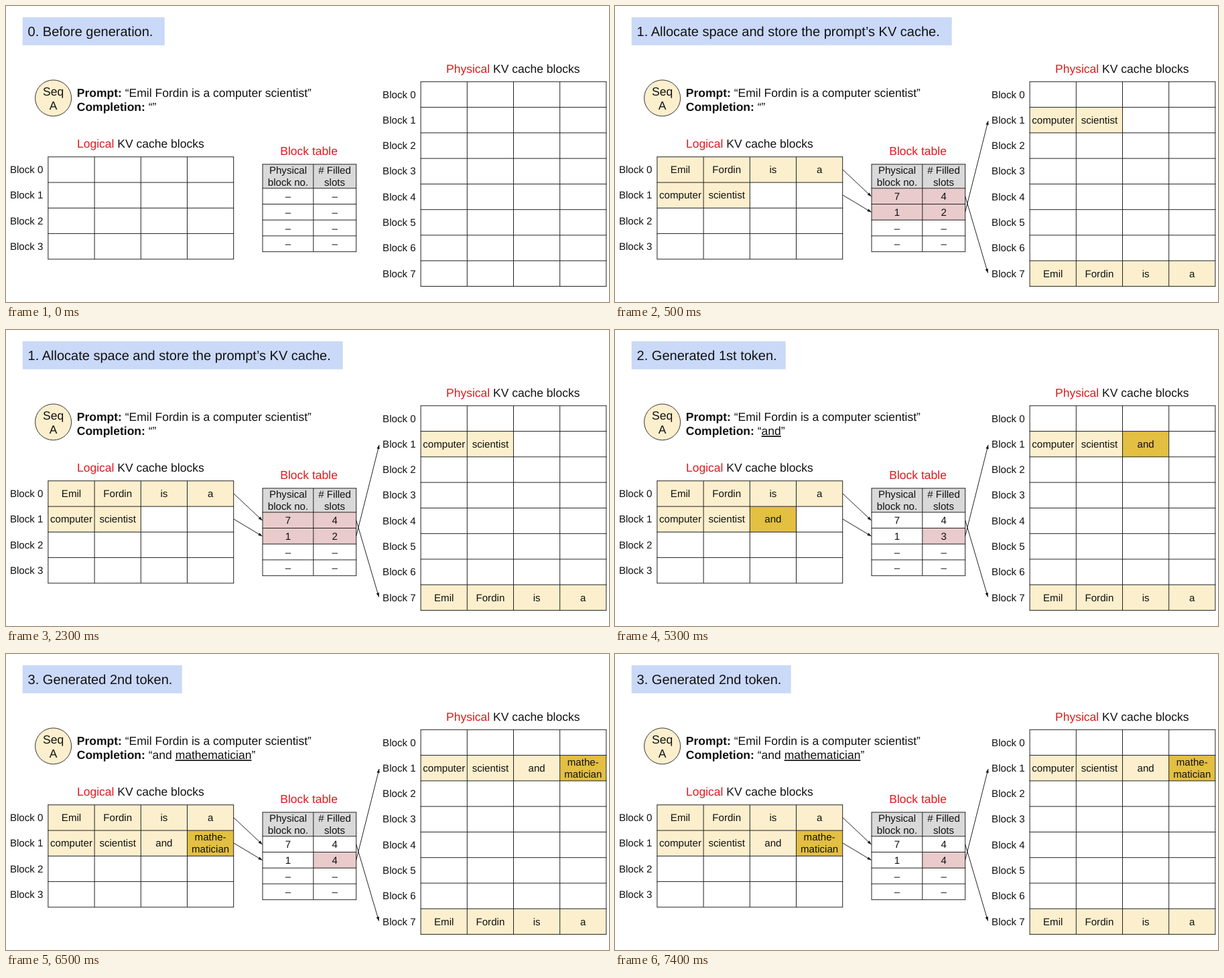
An HTML page for the animation above (8 s loop, 900 by 443 pixels).

```html
<!DOCTYPE html>
<html lang="en">
<head>
<meta charset="utf-8">
<title>KV cache blocks</title>
<style>
  html, body { margin: 0; width: 100%; height: 100%; overflow: hidden; background: #fff; }
  svg { display: block; width: 100%; height: 100%; }
  text {
    font-family: "Liberation Sans", Arial, sans-serif;
    fill: #111;
    text-rendering: geometricPrecision;
    white-space: pre;
  }
  .small { font-size: 15.1px; }
  .mid { font-size: 17.5px; }
  .title { font-size: 20px; }
  .center { text-anchor: middle; }
  .red { fill: #df1a1f; }
  .bold { font-weight: bold; }
  .under { text-decoration: underline; }
  .line { fill: none; stroke: #222; stroke-width: 1; }
</style>
</head>
<body>
<svg id="stage" viewBox="0 0 900 443"></svg>
<script>
const LOOP = 8000;
const CREAM = '#fcefcd', GOLD = '#e3bf42', PINK = '#e9cbcb', GREY = '#d9d9d9', BLUE = '#cad9f7';

const LOGICAL = { x: 62.9, y: 225.8, w: 69.2, h: 38.28, rows: 4 };
const PHYSICAL = { x: 619.1, y: 113.3, w: 69.2, h: 38.28, rows: 8 };
const TABLE = { cols: [383, 458.8, 522.7], top: 236.9, y: 272.8, h: 23.73, rows: 4 };

const FIRST = ['Emil', 'Fordin', 'is', 'a'];
const SECOND = ['computer', 'scientist', 'and', 'mathe-|matician'];

// used: tokens in the second block; hot: freshly written table cells, row then column
const STEPS = [
  { at: 0, title: '0. Before generation.', width: 212, used: 0, done: '', fresh: '', hot: [] },
  { at: 500, title: '1. Allocate space and store the prompt’s KV cache.', width: 478, used: 2,
    done: '', fresh: '', hot: ['00', '01', '10', '11'] },
  { at: 3500, title: '2. Generated 1st token.', width: 230, used: 3, done: '', fresh: 'and', hot: ['11'] },
  { at: 6500, title: '3. Generated 2nd token.', width: 238, used: 4,
    done: 'and ', fresh: 'mathematician', hot: ['11'] }
];

const rect = (x, y, w, h, fill) => `<rect x="${x}" y="${y}" width="${w}" height="${h}" fill="${fill}"/>`;
const text = (x, y, cls, str) => `<text x="${x}" y="${y}" class="${cls}">${str}</text>`;
const span = (cls, str) => `<tspan class="${cls}">${str}</tspan>`;
const path = d => `<path class="line" d="${d}"/>`;

function lines(xs, ys, top = ys[0]) {
  const left = xs[0] - 0.5, right = xs[xs.length - 1] + 0.5, bottom = ys[ys.length - 1];
  const rows = top === ys[0] ? ys : [top, ...ys];
  return path(rows.map(y => `M${left} ${y}H${right}`).join('') +
    xs.map(x => `M${x} ${top}V${bottom}`).join(''));
}

function grid(g) {
  const xs = Array.from({ length: 5 }, (_, i) => g.x + i * g.w);
  const ys = Array.from({ length: g.rows + 1 }, (_, i) => g.y + i * g.h);
  const labels = ys.slice(0, -1).map((y, i) => text(g.x - 57, y + g.h / 2 + 5.2, 'small', 'Block ' + i));
  return lines(xs, ys) + labels.join('');
}

function cell(g, col, row, word, fill) {
  const x = g.x + col * g.w, y = g.y + row * g.h;
  const mid = y + g.h / 2;
  const parts = word.split('|');
  const base = parts.length > 1 ? mid - 4 : mid + 5.2;
  return rect(x, y, g.w, g.h, fill) +
    parts.map((p, i) => text(x + g.w / 2, base + i * 18, 'small center', p)).join('');
}

function tokens(g, firstRow, secondRow, used) {
  if (!used) return '';
  const a = FIRST.map((w, i) => cell(g, i, firstRow, w, CREAM));
  const b = SECOND.slice(0, used).map((w, i) =>
    cell(g, i, secondRow, w, used > 2 && i === used - 1 ? GOLD : CREAM));
  return a.join('') + b.join('');
}

function table(step) {
  const { cols, top, y, h, rows } = TABLE;
  const mids = [421, 490.6];
  const values = step.used ? [[7, 4], [1, step.used]] : [];
  const ys = Array.from({ length: rows + 1 }, (_, i) => y + i * h);
  let out = rect(cols[0], top, cols[2] - cols[0], y - top, GREY);
  [['Physical', 'block no.'], ['# Filled', 'slots']].forEach((pair, c) =>
    pair.forEach((s, i) => { out += text(mids[c], 251.2 + i * 18, 'small center', s); }));
  for (let r = 0; r < rows; r++) {
    for (let c = 0; c < 2; c++) {
      if (step.hot.includes('' + r + c)) out += rect(cols[c], ys[r], cols[c + 1] - cols[c], h, PINK);
      out += text(mids[c], ys[r] + h / 2 + 5.5, 'small center', values[r] ? values[r][c] : '–');
    }
  }
  return out + lines(cols, ys, top);
}

function arrow(x0, y0, x1, y1) {
  const angle = Math.atan2(y1 - y0, x1 - x0) * 180 / Math.PI;
  return path(`M${x0} ${y0}L${x1} ${y1}`) +
    `<path d="M0 0L-6 -2.2V2.2Z" fill="#111" transform="translate(${x1} ${y1}) rotate(${angle})"/>`;
}

function scene(step) {
  const quote = '“' + step.done + (step.fresh && span('under', step.fresh)) + '”';
  const arrows = arrow(340, 245, 382.5, 285) + arrow(340, 283, 382.5, 308.5) +
    arrow(522.7, 284.7, 556.5, 399.5) + arrow(522.7, 308.4, 557, 172);
  return rect(24.7, 16.8, step.width, 42, BLUE) +
    text(32.6, 45, 'title', step.title) +
    `<circle cx="70.6" cy="137.8" r="27" fill="${CREAM}" stroke="#333"/>` +
    text(70.6, 134.3, 'mid center', 'Seq') + text(70.6, 155.2, 'mid center', 'A') +
    text(105.8, 136.3, 'mid', span('bold', 'Prompt:') + ` “${FIRST.join(' ')} computer scientist”`) +
    text(105.8, 157.3, 'mid', span('bold', 'Completion:') + ' ' + quote) +
    text(106, 212.4, 'mid', span('red', 'Logical') + ' KV cache blocks') +
    text(657, 99.7, 'mid', span('red', 'Physical') + ' KV cache blocks') +
    text(409.3, 223.4, 'mid red', 'Block table') +
    tokens(LOGICAL, 0, 1, step.used) + tokens(PHYSICAL, 7, 1, step.used) +
    grid(LOGICAL) + grid(PHYSICAL) + table(step) +
    (step.used ? arrows : '');
}

const stage = document.getElementById('stage');
const start = performance.now();
let shown = null;

function draw() {
  const t = Math.max(0, performance.now() - start) % LOOP;
  const step = STEPS.filter(s => s.at <= t).pop();
  if (step !== shown) {
    stage.innerHTML = scene(step);
    shown = step;
  }
  requestAnimationFrame(draw);
}
draw();
</script>
</body>
</html>
```
